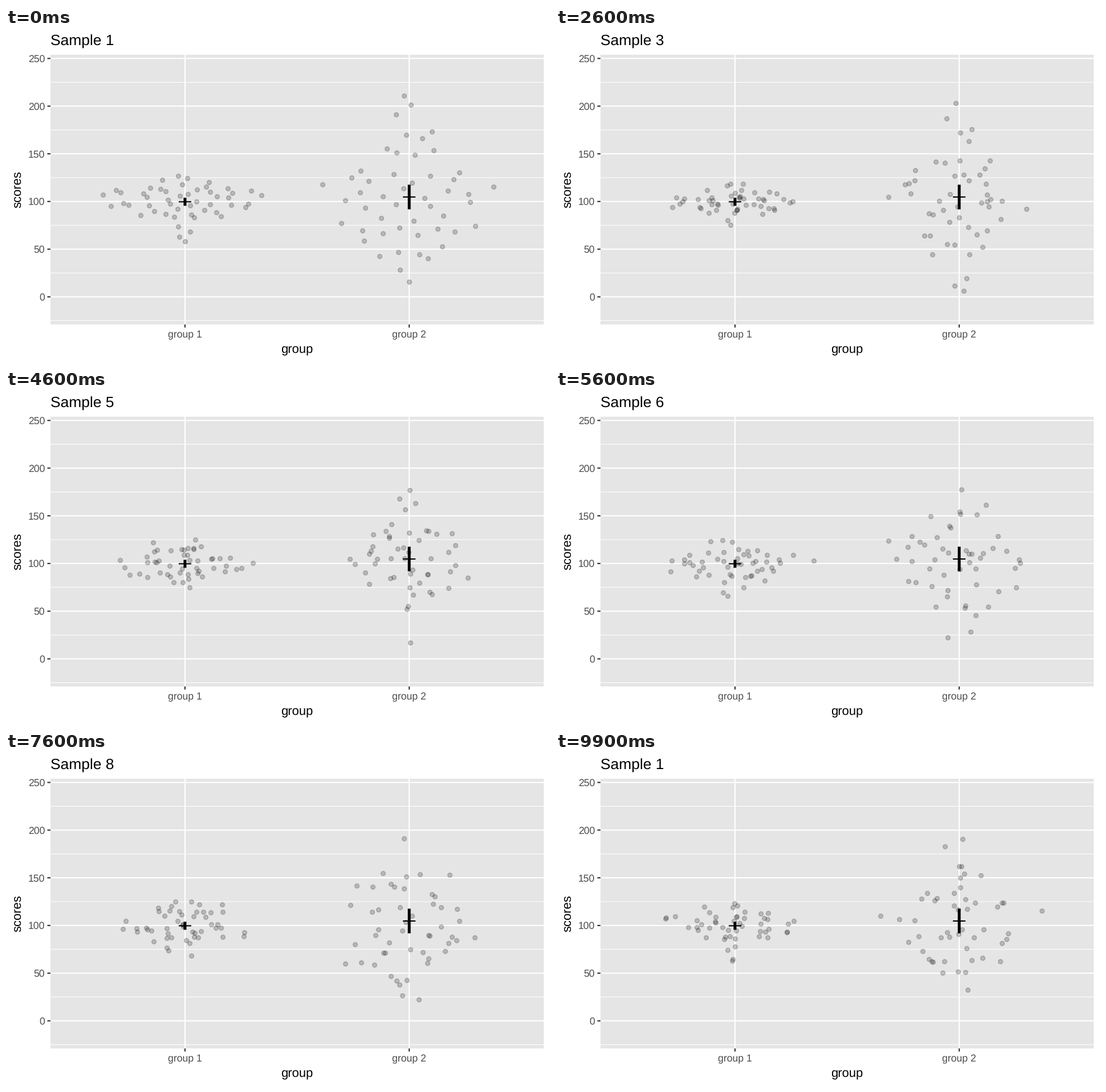
Recreate the animation shown at these times as a matplotlib script. Size 954x587 px, loop 10 s.

```python
import numpy as np
import matplotlib.pyplot as plt
from matplotlib.animation import FuncAnimation
from matplotlib.patches import Rectangle

W, H, DPI = 954, 587, 144
N = 50
STATES, STATE_FRAMES, MOVE_FRAMES = 10, 10, 5
CENTERS = (313.9, 707.1)
MEANS = (99.7, 104.7)
MARGINS = (4.2, 12.9)
SPREAD = 0.4 * (CENTERS[1] - CENTERS[0])
LEFT, RIGHT, TOP, BOTTOM = 78, 943, 47, 521

plt.rcParams.update({
    "font.family": "Liberation Sans",
    "text.hinting": "none",
    "path.snap": False,
})

# Key points (rank: score) of the first sample; the ranks between are interpolated
FIRST = (
    {0: 58, 3: 73.4, 4: 83.2, 9: 87, 15: 95.2, 23: 98, 26: 104,
     31: 107, 40: 112.2, 44: 115.2, 45: 118, 49: 126.8},
    {0: 15.8, 2: 40.3, 5: 46.8, 8: 65, 14: 74.3, 18: 85.3, 19: 93.1, 33: 121.7,
     39: 131.9, 40: 149, 43: 155.7, 44: 166, 46: 173.3, 47: 191.5, 49: 211},
)

# Lowest and highest score of group 2 in the later samples
RANGES = [(18, 205), (-10, 215), (-10, 179), (6, 195), (2, 186),
          (-6, 190), (-6, 191), (-8, 200), (-16, 194)]

rng = np.random.default_rng(12)


def score_y(score):
    return 472.5 - 1.676 * np.asarray(score, float)


def van_der_corput(i):
    value, step = 0.0, 0.5
    while i:
        value += step * (i & 1)
        i >>= 1
        step /= 2
    return value


OFFSETS = 2 * np.array([van_der_corput(i + 1) for i in range(N)]) - 1


def density(at, scores):
    q1, q3 = np.percentile(scores, [25, 75])
    scale = min(scores.std(ddof=1), (q3 - q1) / 1.34)
    width = 0.5 * 0.9 * scale * N ** -0.2
    return np.exp(-0.5 * ((at[:, None] - scores) / width) ** 2).sum(axis=1)


def swarm(scores, center):
    """Spread sorted scores sideways in proportion to their density."""
    grid = np.linspace(scores[0], scores[-1], 1000)
    shape = density(scores, scores) / density(grid, scores).max()
    return np.column_stack([center + OFFSETS * shape * SPREAD, score_y(scores)])


def key_scores(keys):
    return np.interp(np.arange(N), list(keys), list(keys.values()))


def draw_scores(low, mean, high):
    """Sorted bell-shaped scores that reach exactly from low to high."""
    z = np.sort(rng.normal(size=(3, N)), axis=1).mean(axis=0)
    return np.interp(z, [z[0], 0, z[-1]], [low, mean, high])


def build_sample(groups):
    return np.vstack([rng.permutation(swarm(scores, center))
                      for scores, center in zip(groups, CENTERS)])


samples = [build_sample([key_scores(keys) for keys in FIRST])]
for low, high in RANGES:
    narrow = draw_scores(rng.uniform(60, 74), MEANS[0], rng.uniform(124, 134))
    samples.append(build_sample([narrow, draw_scores(low, MEANS[1], high)]))

fig = plt.figure(figsize=(W / DPI, H / DPI), dpi=DPI, facecolor="white")
ax = fig.add_axes([0, 0, 1, 1])
ax.set_xlim(0, W)
ax.set_ylim(H, 0)
ax.axis("off")


def line(x, y, px, color, z):
    ax.plot(x, y, color=color, lw=px * 72 / DPI, solid_capstyle="butt", zorder=z)


def label(x, y, text, size, color="black", ha="center", rotation=0):
    return ax.text(x, y, text, fontsize=size, color=color, ha=ha, va="baseline",
                   rotation=rotation, rotation_mode="anchor")


# Panel, grid and axes
ax.add_patch(Rectangle((LEFT, TOP), RIGHT - LEFT, BOTTOM - TOP,
                       color="#e5e5e5", lw=0, zorder=0))
for score in range(-25, 250, 50):
    line([LEFT, RIGHT], [score_y(score)] * 2, 1.07, "white", 1)
for score in range(0, 251, 50):
    y = score_y(score)
    line([LEFT, RIGHT], [y, y], 2.13, "white", 2)
    line([LEFT - 5.5, LEFT], [y, y], 2.13, "#333333", 2)
    label(68, y + 6.3, str(score), 8.8, "#4d4d4d", ha="right")
for i, x in enumerate(CENTERS, 1):
    line([x, x], [TOP, BOTTOM], 2.13, "white", 2)
    line([x, x], [BOTTOM, BOTTOM + 5.5], 2.13, "#333333", 2)
    label(x - 0.4, 544, f"group {i}", 8.8, "#4d4d4d")
label(510, 571, "group", 11)
label(27.6, 284, "scores", 11, rotation=90)
title = label(78, 31, "Sample 1", 13.2, ha="left")

# Means with their intervals
for x, mean, margin in zip(CENTERS, MEANS, MARGINS):
    line([x, x], score_y([mean - margin, mean + margin]), 5, "black", 5)
    line([x - 11, x + 11], [score_y(mean)] * 2, 2.13, "black", 5)

dots = ax.scatter(*samples[0].T, s=3.9 ** 2, facecolor=(0, 0, 0, 0.2),
                  edgecolor=(0, 0, 0, 0.2), linewidth=0.71, zorder=4)


def update(frame):
    state, step = divmod(frame, STATE_FRAMES)
    after = (state + 1) % STATES
    t = max(0, step - (STATE_FRAMES - MOVE_FRAMES)) / MOVE_FRAMES
    dots.set_offsets((1 - t) * samples[state] + t * samples[after])
    title.set_text(f"Sample {(after if t > 0.5 else state) + 1}")
    return dots, title


anim = FuncAnimation(fig, update, frames=STATES * STATE_FRAMES, interval=100,
                     repeat=True, repeat_delay=0, blit=False)
plt.show()
```
